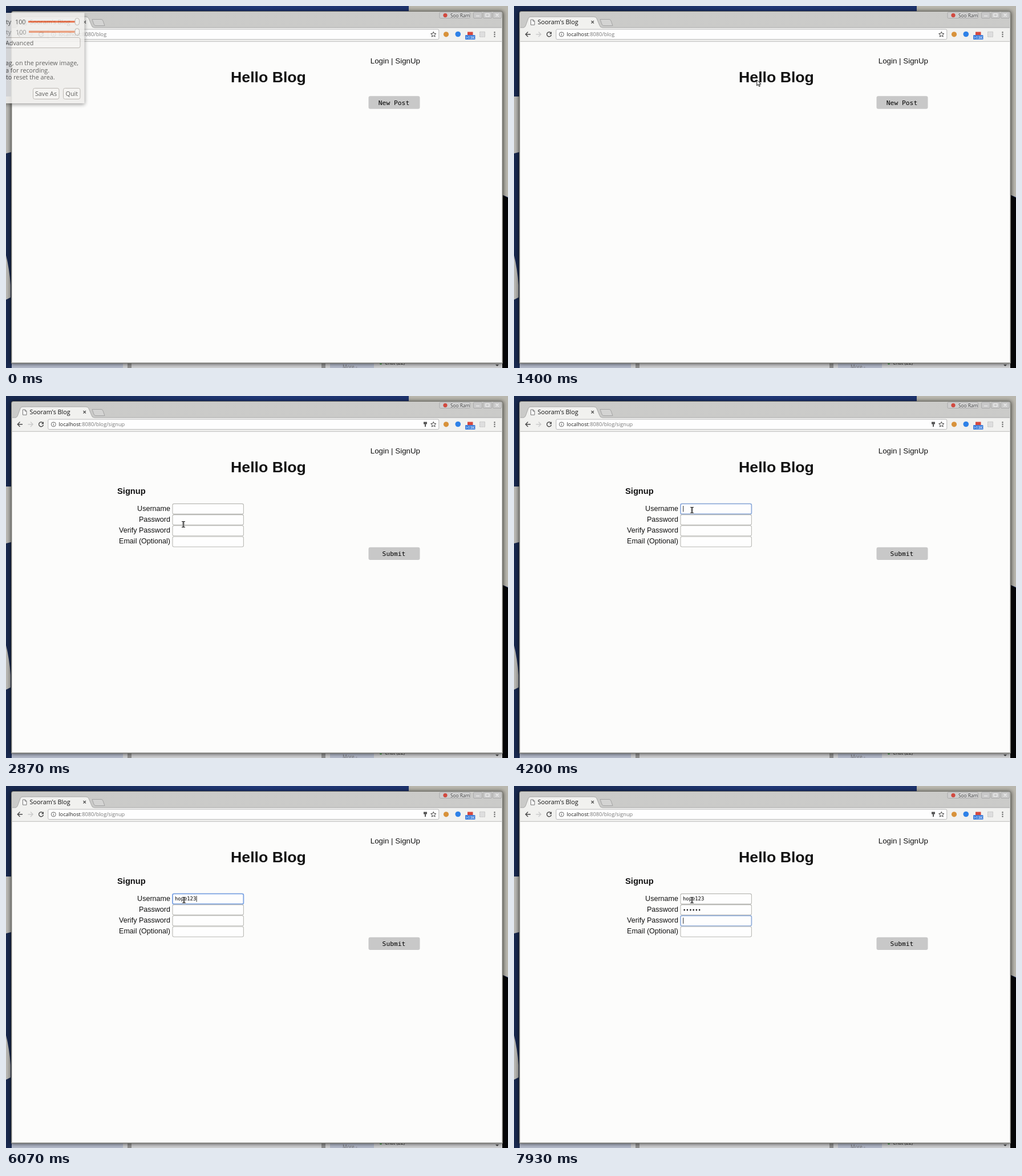
An HTML page for the animation above (8000 ms loop, 880 by 636 pixels).

```html
<!DOCTYPE html>
<html lang="en">
<head>
<meta charset="utf-8">
<title>Blog signup</title>
<style>
  html, body { margin: 0; width: 100%; height: 100%; overflow: hidden; background: #1c2f63; }
  svg { display: block; width: 100%; height: 100%; }
  .ui { font-family: "Open Sans", "Noto Sans", sans-serif; }
  .page { font-family: "Liberation Sans", Arial, sans-serif; fill: #111; }
  .mono { font-family: "DejaVu Sans Mono", monospace; }
  .line { fill: none; stroke: #4a4a4a; stroke-width: 1.4; }
</style>
</head>
<body>
<svg viewBox="0 0 880 636">
  <defs>
    <filter id="soft" x="-10%" y="-10%" width="120%" height="120%"><feGaussianBlur stdDeviation="3.5"/></filter>
    <linearGradient id="blue"><stop offset="0" stop-color="#18294f"/><stop offset=".5" stop-color="#203878"/><stop offset="1" stop-color="#1c3068"/></linearGradient>
    <linearGradient id="bar" x2="0" y2="1"><stop offset="0" stop-color="#cbcbc9"/><stop offset="1" stop-color="#c3c3c3"/></linearGradient>
    <clipPath id="below"><rect y="627" width="880" height="9"/></clipPath>
  </defs>

  <!-- desktop -->
  <rect width="880" height="636" fill="url(#blue)"/>
  <path d="M706 0H880V336L866 330V12H706Z" fill="#b9b7ae"/>
  <path d="M866 330L880 337V636H866Z" fill="#060709"/>
  <path d="M0 159H12V256L0 259ZM0 438Q6 462 8 490V512L0 516Z" fill="#b9b8b4"/>
  <g clip-path="url(#below)">
    <rect x="10" y="627" width="860" height="9" fill="#cfd0d2"/>
    <path d="M10 627H205V636H10ZM568 627H645V636H568Z" fill="#b4bacb"/>
    <path d="M213 627H220V636H213ZM553 627H560V636H553Z" fill="#929292"/>
    <g class="ui" font-size="8.5">
      <text x="590" y="637" fill="#777">More -</text>
      <text x="664" y="630" fill="#222">Chat (22)</text>
    </g>
    <circle cx="657" cy="628" r="2" fill="#3f9b45"/>
    <path d="M858 630h6l-3 3z" fill="#444"/>
  </g>

  <!-- browser window -->
  <rect x="8" y="9" width="864" height="620" rx="4" opacity=".6" filter="url(#soft)"/>
  <path d="M9 628V13Q9 9 13 9H867Q871 9 871 13V628Z" fill="#77776f"/>
  <path d="M10 627V13Q10 10 13 10H867Q870 10 870 13V627Z" fill="url(#bar)"/>
  <path d="M11 38H17Q20 37 21 33L25 22Q26 19 29 19H140Q144 19 145 22L150 34Q151 38 155 38H869V62H11Z" fill="#f1f1ef"/>
  <path d="M11 38H17Q20 37 21 33L25 22Q26 19 29 19H140Q144 19 145 22L150 34Q151 38 155 38H869" fill="none" stroke="#9b9b9b" stroke-width=".8"/>
  <path d="M151 23.5H167Q169 23.5 170 26L173 34.5H157Q155 34.5 154 32Z" fill="#d4d4d3" stroke="#999" stroke-width=".8"/>
  <rect x="11" y="62" width="858" height="564" fill="#fcfcfb"/>
  <path d="M11 62.3H869" stroke="#b5b5b3" stroke-width=".9"/>
  <rect x="760" y="11" width="53.5" height="10.5" rx="1.5" fill="#cecece" stroke="#a2a2a2" stroke-width=".8"/>
  <circle cx="770" cy="16.3" r="3.6" fill="#d14a40"/>
  <text class="ui" x="779" y="19.5" font-size="8.3" fill="#222" stroke="#eee" stroke-width="1.3" paint-order="stroke">Soo Ram</text>
  <g fill="#c9c9c9" stroke="#a4a4a4" stroke-width=".8">
    <rect x="819.5" y="11" width="15" height="10.5" rx="1.5"/>
    <rect x="836.5" y="11" width="15" height="10.5" rx="1.5"/>
    <rect x="853.5" y="11" width="15" height="10.5" rx="1.5"/>
  </g>
  <path d="M824 17.5h6M841 13.5h6v5h-6zM858.5 13.5l5 5m0-5l-5 5" fill="none" stroke="#f2f2f2" stroke-width="1.2"/>

  <!-- tab and toolbar -->
  <text class="ui" x="41.5" y="32" font-size="10.8" fill="#111">Sooram's Blog</text>
  <path d="M135.5 26l4.5 4.5m0-4.5l-4.5 4.5" class="line" style="stroke-width:1.1"/>
  <path id="file" d="M29.5 24h4l2.5 2.5v6.7h-6.5zM33.3 24v2.8H36" fill="#fff" stroke="#666" stroke-width=".9"/>
  <path id="spin" class="line" style="stroke:#777"/>
  <path class="line" d="M29 49.8H20.5M24.5 45.6L20.3 49.8l4.2 4.2"/>
  <path class="line" style="stroke:#ccc" d="M38.5 49.8H47M43 45.6l4.2 4.2-4.2 4.2"/>
  <g id="reload"><path class="line" d="M64.8 47.4A4 4 0 1 0 65.5 50.7"/><path d="M66 45v4.2h-4.2z" fill="#4a4a4a"/></g>
  <path id="stop" class="line" d="M58 46.3l7 7m0-7l-7 7"/>
  <rect x="73.8" y="41" width="685" height="17.6" rx="2" fill="#fefefe" stroke="#b2b2b2" stroke-width=".9"/>
  <circle cx="83.3" cy="49.8" r="4" class="line" style="stroke:#666;stroke-width:1"/>
  <path d="M83.3 49v3M83.3 47v1" stroke="#666"/>
  <text class="ui" x="92.3" y="53" font-size="9.2" fill="#222">localhost<tspan fill="#777" id="url"></tspan></text>
  <path id="key" d="M732 45.5h6v4h-2v4.5h-2v-4.5h-2z" fill="#555"/>
  <path d="M749.3 45.2l1.3 3.1 3.3.3-2.5 2.2.8 3.3-2.9-1.8-2.9 1.8.8-3.3-2.5-2.2 3.3-.3z" fill="none" stroke="#444" stroke-width="1"/>
  <circle cx="771.5" cy="49.8" r="4.6" fill="#d8923b"/>
  <circle cx="792.3" cy="49.5" r="4.8" fill="#2f82e8"/>
  <rect x="809" y="45.5" width="9.5" height="6" fill="#d6493e"/>
  <rect x="805" y="51" width="17.5" height="8" rx="1" fill="#3f7fdb"/>
  <text class="ui" x="813.7" y="57.7" font-size="6.6" fill="#fff" text-anchor="middle">&gt;13K</text>
  <rect x="830.5" y="45.3" width="9" height="9" fill="#dedede" stroke="#bdbdbd" stroke-dasharray="2 1"/>
  <path d="M856.5 45.2v2m0 1.6v2m0 1.6v2" stroke="#555" stroke-width="2"/>

  <!-- page -->
  <g class="page">
    <text x="726" y="101" font-size="13.33" text-anchor="end">Login | SignUp</text>
    <text x="460" y="134" font-size="26.67" font-weight="700" text-anchor="middle">Hello Blog</text>
  </g>
  <g id="home">
    <rect x="635.5" y="158.3" width="90" height="22.4" rx="3" fill="#c8c8c8"/>
    <text class="mono" x="680" y="173.6" font-size="11.3" text-anchor="middle">New Post</text>
  </g>
  <g id="signup">
    <text class="page" x="195" y="172" font-size="14.7" font-weight="700">Signup</text>
    <g id="fields"></g>
    <rect x="635.5" y="265.7" width="90" height="22.4" rx="3" fill="#c8c8c8"/>
    <text class="mono" x="680" y="281" font-size="11.3" text-anchor="middle">Submit</text>
    <g id="menu" class="ui" font-size="10.5" font-weight="700"></g>
  </g>
  <g id="status">
    <path d="M12 607H294Q297 607 297 610V625.5H12Z" fill="#efefee" stroke="#d2d2d2" stroke-width=".8"/>
    <text class="ui" x="14.5" y="619.5" font-size="11.34" fill="#555">localhost:8080/blog/signup</text>
  </g>

  <!-- recorder panel -->
  <g id="panel" class="ui" font-size="10.8" fill="#4a4a48">
    <rect x="-20" y="16" width="158" height="157" opacity=".45" filter="url(#soft)" fill="#000"/>
    <rect x="-10" y="12" width="147.5" height="159" fill="#efeeec"/>
    <text x="0" y="32">ty</text><text x="16" y="32">100</text>
    <g opacity=".6"><text x="0" y="49.5">ty</text><text x="17" y="49.5">100</text></g>
    <path d="M39 27.6H124" stroke="#e8683f" stroke-width="3.4"/>
    <path d="M40 45.3H124" stroke="#e8936f" stroke-width="3.4"/>
    <g fill="#f4f3f1" stroke="#b3aea8">
      <rect x="121" y="21.5" width="7.5" height="12" rx="3.7"/>
      <rect x="121" y="39.5" width="7.5" height="12" rx="3.7"/>
      <rect x="-10" y="55.5" width="140" height="18" rx="3"/>
      <rect x="47.5" y="144.5" width="45.5" height="19" rx="3"/>
      <rect x="100.5" y="144.5" width="29.5" height="19" rx="3"/>
    </g>
    <text x="-1" y="68.5">Advanced</text>
    <text x="-1" y="104">ag, on the preview image,</text>
    <text x="-1" y="116.5">a for recording.</text>
    <text x="0" y="129">to reset the area.</text>
    <text x="70" y="158" text-anchor="middle">Save As</text>
    <text x="115.3" y="158" text-anchor="middle">Quit</text>
  </g>

  <path id="arrow" d="M0 0V10.2L2.4 8.1 4 11.8 5.7 11 4.1 7.5H7.2Z" fill="#fff" stroke="#111" stroke-width="1"/>
  <g id="beam" fill="none">
    <path d="M-3 -5H3M0 -5V5M-3 5H3" stroke="#fff" stroke-width="3"/>
    <path d="M-3 -5H3M-.8 -5V5M.8 -5V5M-3 5H3" stroke="#222" stroke-width="1"/>
  </g>
</svg>
<script>
const LOOP = 8000, CLICK = 2200, LOADED = 2470, CHAR = 5.33;
const FOCUS = [4130, 6600, 7870];
const LABELS = ['Username', 'Password', 'Verify Password', 'Email (Optional)'];
const NAMES = ['hobbytilly', 'hillpear', 'hilly', 'hasily', 'heatlily', 'hillierfern'];
const USER = 'hope123', USER_KEYS = [5130, 5330, 5530, 5800, 5930, 6000, 6070];
const PASS = '••••••', PASS_KEYS = [7200, 7330, 7400, 7530, 7600, 7670];
// pointer stops: time, x, y
const PATH = [[600, -12, 150], [1200, 330, 140], [1800, 696, 100.5], [2400, 696, 100.5], [2870, 311, 225.5],
  [3000, 230, 173], [3130, 306, 201], [3270, 310, 201], [3330, 312, 200.5]];

const $ = id => document.getElementById(id);
const show = (el, on) => el.setAttribute('display', on ? 'inline' : 'none');
const count = (times, t) => times.filter(k => k <= t).length;

function add(parent, tag, attrs, text = '') {
  const el = document.createElementNS('http://www.w3.org/2000/svg', tag);
  for (const k in attrs) el.setAttribute(k, attrs[k]);
  el.textContent = text;
  return parent.appendChild(el);
}

const fields = LABELS.map((label, i) => {
  const y = 189 + 19.2 * i, g = $('fields');
  const box = { x: 292, y: y + .4, width: 124.4, height: 18, rx: 2.5 };
  add(g, 'text', { class: 'page', x: 288, y: y + 12.6, 'font-size': 12.55, 'text-anchor': 'end' }, label);
  add(g, 'rect', { ...box, fill: '#fefefe', stroke: '#b9b9b5', 'stroke-width': 1.1 });
  return {
    ring: add(g, 'rect', { ...box, fill: 'none', stroke: '#7ea6e6', 'stroke-width': 1.8 }),
    text: add(g, 'text', { class: 'mono', x: 296, y: y + 12.4, 'font-size': 8.85 }),
    caret: add(g, 'rect', { y: y + 4, width: .9, height: 10.5, fill: '#111' })
  };
});

const menuBox = add($('menu'), 'rect', { x: 291.4, y: 208.4, width: 125, fill: '#fefefe', stroke: '#bdbdbd', 'stroke-width': .9 });
const rows = NAMES.map((_, i) => add($('menu'), 'text', { x: 296.7, y: 220.4 + 15.9 * i }));

function pointer(t) {
  const i = PATH.findIndex(p => p[0] > t);
  if (i === 0) return PATH[0].slice(1);
  if (i < 0) return PATH[PATH.length - 1].slice(1);
  const [a, x, y] = PATH[i - 1], [b, u, v] = PATH[i];
  const k = (t - a) / (b - a), e = k * k * (3 - 2 * k);
  return [x + (u - x) * e, y + (v - y) * e];
}

function drawSpinner(t) {
  const a = (t - CLICK) / 160 - 1.6, b = a + .2 + Math.min(3.5, (t - CLICK) / 80);
  const at = r => `${32.5 + 4 * Math.cos(r)} ${28.5 + 4 * Math.sin(r)}`;
  $('spin').setAttribute('d', `M${at(a)}A4 4 0 ${b - a > Math.PI ? 1 : 0} 1 ${at(b)}`);
}

function drawForm(t) {
  const active = count(FOCUS, t) - 1;
  const values = [USER.slice(0, count(USER_KEYS, t)), PASS.slice(0, count(PASS_KEYS, t)), '', ''];
  const last = Math.max(...[...FOCUS, ...USER_KEYS, ...PASS_KEYS].filter(k => k <= t));
  const lit = (t - last) % 1200 < 600;
  fields.forEach((f, i) => {
    f.text.textContent = values[i];
    show(f.ring, i === active);
    f.ring.setAttribute('opacity', Math.min(1, .4 + (t - FOCUS[i]) / 220 || 0));
    show(f.caret, i === active && lit);
    f.caret.setAttribute('x', 296.3 + CHAR * values[i].length);
  });
  const hits = values[0] && active === 0 ? NAMES.filter(n => n.startsWith(values[0])) : [];
  show($('menu'), hits.length);
  menuBox.setAttribute('height', 16 * hits.length);
  rows.forEach((r, i) => r.textContent = hits[i] || '');
}

function render(t) {
  const loaded = t >= LOADED, loading = t >= CLICK && !loaded;
  const [x, y] = pointer(t);
  $('panel').setAttribute('opacity', Math.max(0, .87 * (1 - t / 230)));
  $('url').textContent = ':8080/blog' + (loaded ? '/signup' : '');
  show($('home'), !loaded);
  show($('signup'), loaded);
  show($('key'), loaded);
  show($('file'), !loading);
  show($('spin'), loading);
  show($('reload'), !loading);
  show($('stop'), loading);
  show($('status'), t >= 1800 && !loaded);
  if (loading) drawSpinner(t);
  if (loaded) drawForm(t);
  const beam = t > 2750;
  show($('arrow'), !beam);
  show($('beam'), beam);
  $(beam ? 'beam' : 'arrow').setAttribute('transform', `translate(${x} ${y})`);
}

const start = performance.now();
function tick(now) {
  render(Math.max(0, now - start) % LOOP);
  requestAnimationFrame(tick);
}
render(0);
requestAnimationFrame(tick);
</script>
</body>
</html>
```
